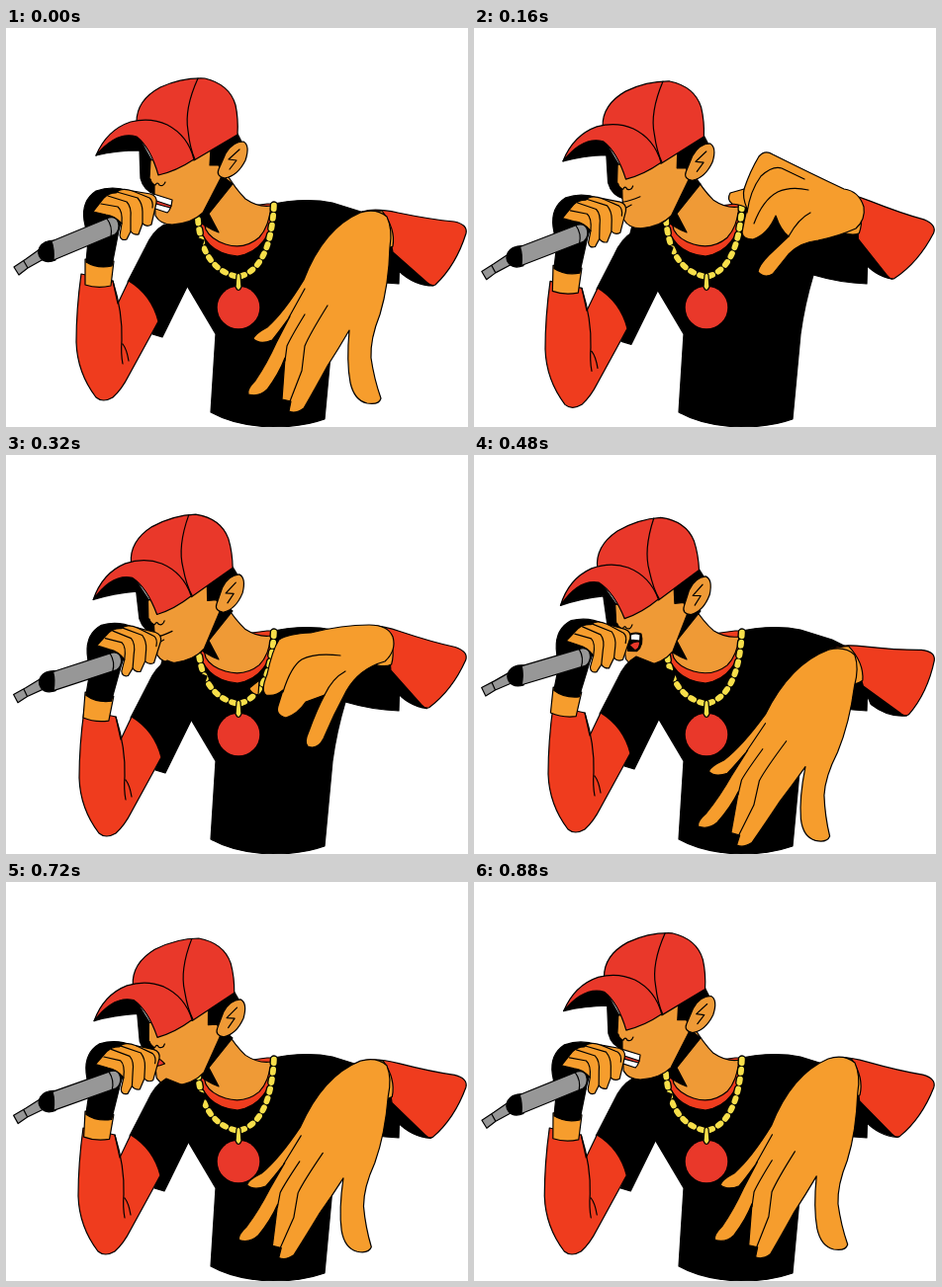
These frames come from a looping animation (467x404 px, 0.96 s). An HTML page:

```html
<!DOCTYPE html>
<html lang="en">
<head>
<meta charset="utf-8">
<title>Rapper</title>
<style>
  html, body { margin: 0; width: 100%; height: 100%; overflow: hidden; background: #fff; }
  svg { display: block; width: 467px; height: 404px; }
  path { stroke: #000; stroke-width: 1.2; stroke-linejoin: round; stroke-linecap: round; fill: none; }
  .black { fill: #000; }
  .face { fill: #ef9a36; }
  .skin { fill: #f69d2d; }
  .cap { fill: #e9382a; }
  .red { fill: #ef3c1e; }
  .gray { fill: #979797; }
  .white { fill: #fff; }
  .gold { fill: #f7df4a; }
  .chain { stroke-width: 8.5; stroke-dasharray: 3.5 6.5; }
  .links { stroke: #f7df4a; stroke-width: 5.8; }
</style>
</head>
<body>
<svg viewBox="0 0 467 404">
  <path class="black" d="M160 200L195 188L262 180Q300 171 330 177L362 187L388 200L398 225L397 259Q370 258 343 250Q334 280 330 310L322 396Q300 404 270 404Q232 403 207 389L212 310L183 261L150 240Z"/>
  <path class="red" d="M193 190Q198 228 234 231Q267 226 274 178L264 178L204 186Z"/>
  <path id="neck" class="face" d="M222 146Q232 163 242 173Q255 182 268 180Q266 201 256 212Q241 225 222 219Q207 214 202 204L198 188Z"/>
  <path class="black" d="M219 150L229 158L205 188L215 207Q202 202 190 192L205 165Z"/>
  <path class="chain" d="M194 194Q198 245 235 252Q268 244 271 177"/>
  <path class="chain links" d="M194 194Q198 245 235 252Q268 244 271 177"/>
  <circle cx="235" cy="283" r="21.3" fill="#e9382a"/>
  <path class="gold" d="M233 250Q235 247 237 250L238 262Q235 269 232 262Z"/>

  <g id="head">
    <path class="black" d="M91 129Q108 103 130 103L155 148L152 169Q139 165 136 152L135 124Q112 124 91 129Z"/>
    <path class="face" d="M146 134L145 152Q147 157 150 159L150 168L151 190Q156 199 168 199Q188 198 199 187L217 152L225 110L190 126Z"/>
    <path class="black" d="M207 122L234 107L239 117Q227 118 222 128L218 146L215 139L206 139Z"/>
    <path class="face" d="M222 127Q229 115 240 115Q247 119 242 134Q234 150 221 152Q212 150 215 143Z"/>
    <path d="M236 123L225 133L233 134L226 143M146 153q0 6 5 6q2 -4 4 0q4 2 6 -3"/>
    <g class="mouth" data-shape="teeth">
      <path class="white" d="M149 168L168 174Q167 184 163 187L148 182Z"/>
      <path class="cap" d="M149 174L167 180L166 182L148 177Z"/>
    </g>
    <path class="mouth cap" data-shape="lips" d="M150 168Q155 170 160 176Q155 178 151 178Z"/>
    <path class="mouth" data-shape="closed" d="M150 172Q158 171 168 167M153 178L159 175"/>
    <g class="mouth" data-shape="open">
      <path class="black" d="M156 166Q162 163 169 166Q171 178 163 183L154 182Z"/>
      <path class="white" d="M158 166Q164 164 168 167L167 173L158 171Z"/>
      <path class="cap" d="M156 176Q162 172 167 174Q166 181 161 182Z"/>
    </g>
    <path class="cap" d="M132 95Q132 73 156 60Q178 50 201 51Q226 57 232 78Q235 92 234 108L190 134Z"/>
    <path class="cap" d="M91 129Q102 103 126 95Q146 90 163 98Q184 109 190 133Q172 145 154 149Q146 121 132 110Q112 104 91 129Z"/>
    <path d="M194 51Q180 82 184 104Q186 122 191 133"/>
  </g>

  <g id="arm">
    <path class="black" d="M160 199Q148 206 141 222L123 257L154 297L148 310L158 313L184 260L200 215Z"/>
    <path class="red" d="M76 249Q71 285 71 318Q72 349 91 374Q98 380 108 374Q117 366 124 352L154 297Q147 270 124 256L113 279L108 256Z"/>
    <path d="M108 256Q118 288 117 316Q116 330 118 340M118 320Q122 325 124 337"/>
    <g id="mic">
      <path class="skin" d="M80 234L80 260Q92 264 106 261L109 236Z"/>
      <path class="black" d="M79 195Q76 175 91 165Q108 159 124 165L114 205L107 241Q92 244 81 237L83 215Z"/>
      <path class="gray" d="M34 224L20 234L8 242L13 250L22 243L38 234ZM18 236L22 243"/>
      <path class="black" d="M34 222Q38 215 49 215L50 235Q40 239 35 233Q31 228 34 222Z"/>
      <path class="gray" d="M46 216L104 192Q113 190 114 200Q114 206 110 209L48 235Q49 224 46 216ZM102 193Q108 201 106 211"/>
      <path class="skin" d="M88 186L99 172Q104 167 111 167Q116 161 128 165L146 168Q153 170 152 177L147 199Q142 202 138 198L134 209Q129 210 126 206L122 214Q116 216 115 210L117 198Q110 190 101 189Z"/>
      <path d="M96 178L113 181Q118 185 117 198M103 170L122 176Q127 181 126 192L126 206M112 166L133 172Q138 178 138 186L138 198M128 165L145 172Q149 175 148 182"/>
    </g>
  </g>

  <g id="cuff">
    <path class="black" d="M390 224L397 246Q413 261 432 261Z"/>
    <path class="red" d="M360 186Q373 182 396 187Q430 194 453 196Q467 199 465 208Q455 240 434 260Q430 262 426 258L391 227L385 195Z"/>
    <path class="skin" d="M360 186L380 185Q394 203 391 221Q384 226 370 222Z"/>
  </g>

  <!-- hands from lowest to highest -->
  <g class="hand">
    <path class="skin" d="M358 187Q374 182 385 191Q391 204 388 222Q387 260 378 290Q368 315 369 334Q372 355 379 375Q377 382 365 380Q352 377 348 359Q344 338 347 306Q336 325 325 342Q312 366 301 385Q293 391 286 388L288 378L279 376L282 334Q276 350 264 366Q256 374 245 371Q243 366 252 357Q264 339 273 319L287 292Q277 306 269 316Q257 321 250 315Q251 310 264 303Q281 288 301 255Q321 203 358 187Z"/>
    <path d="M302 264L286 293M302 290Q288 313 284 322L282 337M325 281Q307 310 302 322L299 347L287 378"/>
  </g>
  <g class="hand">
    <path class="skin" d="M367 172Q386 172 391 184Q395 198 383 209Q357 216 344 239Q331 263 321 287Q315 299 305 295Q301 291 306 280Q314 258 322 243L303 250Q295 262 283 266Q272 263 275 254L280 238Q272 245 263 243Q257 239 264 222Q269 198 276 187Q285 181 308 180Q340 172 367 172Z"/>
    <path class="skin" d="M256 228L246 236Q247 241 255 243Z"/>
    <path d="M280 240Q288 214 299 207Q312 200 338 203M322 243Q330 226 343 219"/>
  </g>
  <g class="hand">
    <path class="skin" d="M361 170Q380 164 389 178Q394 192 388 204Q365 230 359 252L360 291Q353 301 343 295Q339 285 341 266L337 242Q328 250 324 273Q316 281 308 276Q305 267 306 250Q303 263 294 260Q289 252 290 234Q281 241 276 234Q272 220 276 204Q279 198 296 198Q308 186 326 182Q346 181 361 170Z"/>
    <path class="skin" d="M280 249L273 261Q277 266 286 264Z"/>
    <path d="M290 234Q288 214 301 203L318 197M306 250Q305 229 319 220L350 210M337 242Q341 224 360 215"/>
  </g>
  <g class="hand">
    <path class="skin" d="M374 163Q389 165 394 181Q396 194 386 203Q368 211 348 215Q329 217 318 229L302 249Q294 254 287 247Q288 240 298 230L318 211Q310 205 305 190Q297 209 282 214Q272 214 271 207Q273 195 276 183Q272 179 261 178Q255 174 259 167L273 163Q279 145 288 130Q294 123 302 128Q342 148 374 163Z"/>
    <path d="M273 163Q271 171 276 183M276 187Q279 165 290 150Q302 139 311 142L334 153M283 198Q292 174 307 166Q320 160 338 164M318 211Q328 193 340 187"/>
  </g>
</svg>
<script>
const STEP = 80, STEPS = 12;

const [neck, head, arm, mic, cuff] =
  ['neck', 'head', 'arm', 'mic', 'cuff'].map(id => document.getElementById(id));
const hands = [...document.querySelectorAll('.hand')];
const mouths = [...document.querySelectorAll('.mouth')];

// Key points are [step, value] pairs
const armKeys = [[0, 0], [3, 11], [6, 5], [9, 0], [12, 0]];
const cuffKeys = [[0, 0], [1, 7], [3, 13], [6, -5.5], [8, -2.5], [10, 8], [12, 0]];
const mouthKeys = [[0, 'teeth'], [1, 'lips'], [2, 'closed'], [5, 'open'], [8, 'lips'], [10, 'teeth']];
const handLimits = [5, 7.5, 9];

function interpolate(keys, step) {
  const next = keys.findIndex(([at]) => at > step);
  const [[t0, v0], [t1, v1]] = [keys[next - 1], keys[next]];
  return v0 + (v1 - v0) * (step - t0) / (t1 - t0);
}

const hold = (keys, step) => keys.filter(([at]) => at <= step).pop()[1];
const move = (el, transform) => el.setAttribute('transform', transform);
const showOnly = (list, test) =>
  list.forEach((el, i) => el.style.display = test(el, i) ? '' : 'none');

function draw(now) {
  const step = Math.floor(now / STEP) % STEPS;
  const nod = (1 - Math.cos(step / STEPS * 2 * Math.PI)) / 2;
  const turn = interpolate(cuffKeys, step);
  const mouth = hold(mouthKeys, step);
  const pose = handLimits.filter(limit => turn >= limit).length;

  move(head, `translate(${-nod} ${9.5 * nod}) rotate(${-6 * nod} 222 160)`);
  move(neck, `translate(0 ${22 * nod}) scale(1 ${1 - .1 * nod})`);
  move(arm, `translate(${4 * nod} ${interpolate(armKeys, step)})`);
  move(mic, `rotate(${6 * nod} 115 195)`);
  move(cuff, `rotate(${turn} 466 205)`);
  // The open hand hangs from the cuff and swings with the nod
  move(hands[0], `translate(0 ${190 - 2 * turn}) skewX(${-3.5 * nod}) rotate(${2.5 * nod} 375 0) translate(0 -190)`);
  showOnly(mouths, el => el.dataset.shape === mouth);
  showOnly(hands, (el, i) => i === pose);
}

function tick() {
  draw(performance.now());
  requestAnimationFrame(tick);
}
tick();
</script>
</body>
</html>
```
